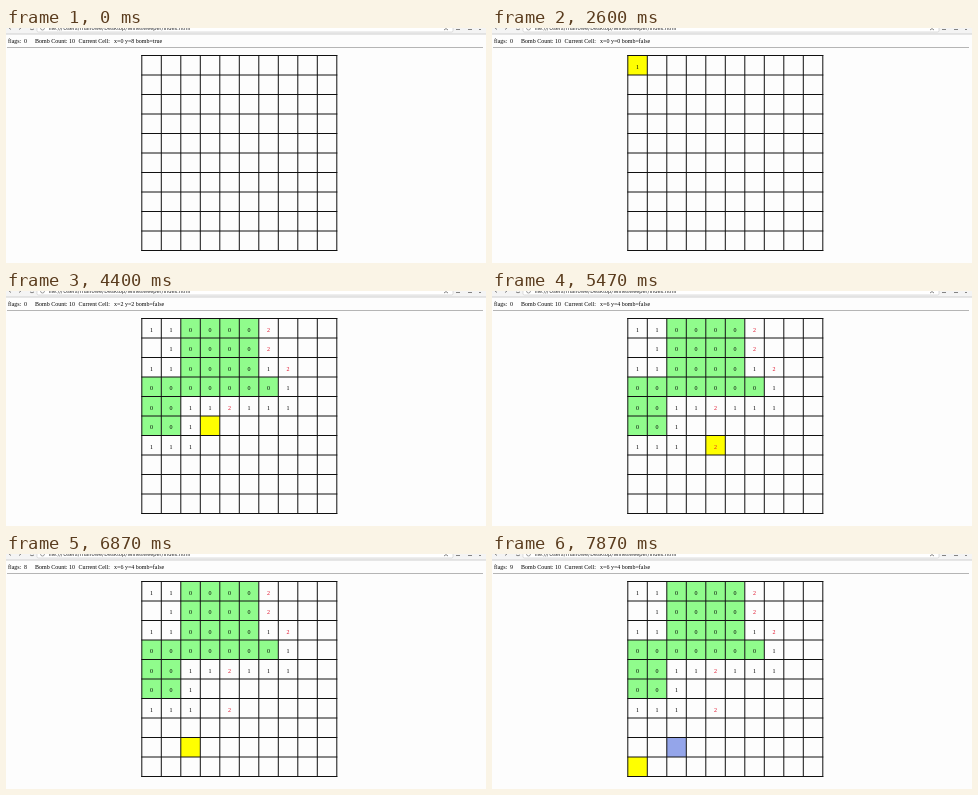
Write an HTML page that moves like this. It is 480x235 px and loops after 8 s.

```html
<!DOCTYPE html>
<html lang="en">
<head>
<meta charset="utf-8">
<title>Mine grid</title>
<style>
  html, body { margin: 0; width: 100%; height: 100%; overflow: hidden; background: #fdfdfd; }
  svg { display: block; width: 480px; height: 235px; }
  text { font: 6px "Liberation Serif", "Times New Roman", serif; fill: #000; white-space: pre; }
  .bar text { font: 5.7px Roboto, Arial, sans-serif; fill: #333; }
  .digit { text-anchor: middle; }
</style>
</head>
<body>
<svg id="stage" viewBox="0 0 480 235">
  <rect width="480" height="235" fill="#fdfdfd"/>
  <g class="bar">
    <rect width="480" height="6" fill="#f4f4f4"/>
    <rect x="31" y="-10" width="416" height="14" rx="1.5" fill="#fff" stroke="#c8c8c8" stroke-width=".6"/>
    <path d="M0 6H480" stroke="#c4c4c4" stroke-width=".8"/>
    <circle cx="36.5" cy="0" r="2" fill="none" stroke="#777" stroke-width=".7"/>
    <text x="42.5" y="1.6">file:///Users/marlowe/Desktop/Minesweeper/index.html</text>
    <path d="M3 0l2 1.5M13 1.5l2-1.5M24 1q2 1.5 4 0M438 2l2-1.4 2 1.4M450 1.5h4M462 1.5h4M473 1.5h2" fill="none" stroke="#777" stroke-width=".9"/>
  </g>
  <text x="2" y="14.6">flags:</text>
  <text x="18" y="14.6" id="flags"></text>
  <text x="29" y="14.6">Bomb Count: 10</text>
  <text x="72.5" y="14.6">Current Cell:</text>
  <text x="108" y="14.6" id="current"></text>
  <path d="M1 19.5H477" stroke="#b5b5b5" stroke-width="1"/>
</svg>
<script>
const LOOP = 8000, SIZE = 10, PITCH = 19.5, LEFT = 135.8, TOP = 27.5;
const COLORS = { plain: "#fdfdfd", clear: "#90fc8c", hover: "#ffff00", flag: "#94a5ea" };

const stage = document.getElementById("stage");
const flags = document.getElementById("flags");
const current = document.getElementById("current");

// Each timeline entry is [start time, value].
const hoverPath = [
  [0, null], [2000, "0,0"], [3070, "1,0"], [3200, "1,1"], [3330, "2,2"],
  [4070, "2,3"], [4200, "3,4"], [4330, "3,5"], [4730, "4,6"],
  [5870, "3,7"], [6070, "2,8"], [7800, "1,9"], [7870, "0,9"]
];
const statusText = [
  [0, "x=0 y=8 bomb=true"], [2600, "x=0 y=0 bomb=false"],
  [3600, "x=2 y=2 bomb=false"], [4870, "x=6 y=4 bomb=false"]
];
const flagCount = [[0, "0"], [5730, "8"], [7730, "9"]];

const FIRST_CLICK = 2600, FLOOD = 3600, LAST_CLICK = 4870, FLAGGED = 7730;
const opened = [
  "1100002", " 100002", "11000012", "00000001", "00112111", "001", "111 2"
];

function add(tag, attrs) {
  const node = document.createElementNS("http://www.w3.org/2000/svg", tag);
  for (const key in attrs) node.setAttribute(key, attrs[key]);
  return stage.appendChild(node);
}

function valueAt(timeline, t) {
  return timeline.filter(([start]) => start <= t).pop()[1];
}

function openTime(col, row) {
  if (col === 0 && row === 0) return FIRST_CLICK;
  return col === 4 && row === 6 ? LAST_CLICK : FLOOD;
}

const cells = [];
for (let row = 0; row < SIZE; row++) {
  for (let col = 0; col < SIZE; col++) {
    const x = LEFT + col * PITCH, y = TOP + row * PITCH;
    const digit = ((opened[row] || "")[col] || "").trim();
    const rect = add("rect", { x, y, width: PITCH, height: PITCH });
    const label = add("text", {
      x: x + PITCH / 2, y: y + 13, class: "digit",
      style: digit === "2" ? "fill:#e0142d" : ""
    });
    cells.push({ key: col + "," + row, digit, rect, label, opensAt: openTime(col, row) });
  }
}

let lines = "";
for (let i = 0; i <= SIZE; i++) {
  const span = SIZE * PITCH, offset = i * PITCH;
  lines += `M${LEFT + offset} ${TOP - .5}v${span + 1}M${LEFT - .5} ${TOP + offset}h${span + 1}`;
}
add("path", { d: lines, stroke: "#111", "stroke-width": 1 });

function render(t) {
  const hovered = valueAt(hoverPath, t);
  flags.textContent = valueAt(flagCount, t);
  current.textContent = valueAt(statusText, t);
  for (const { key, digit, rect, label, opensAt } of cells) {
    const shown = t >= opensAt ? digit : "";
    let state = shown === "0" ? "clear" : "plain";
    if (key === hovered) state = "hover";
    if (key === "2,8" && t >= FLAGGED) state = "flag";
    rect.setAttribute("fill", COLORS[state]);
    label.textContent = shown;
  }
}

const begin = performance.now();
function tick() {
  render((performance.now() - begin) % LOOP);
  requestAnimationFrame(tick);
}
render(0);
requestAnimationFrame(tick);
</script>
</body>
</html>
```
